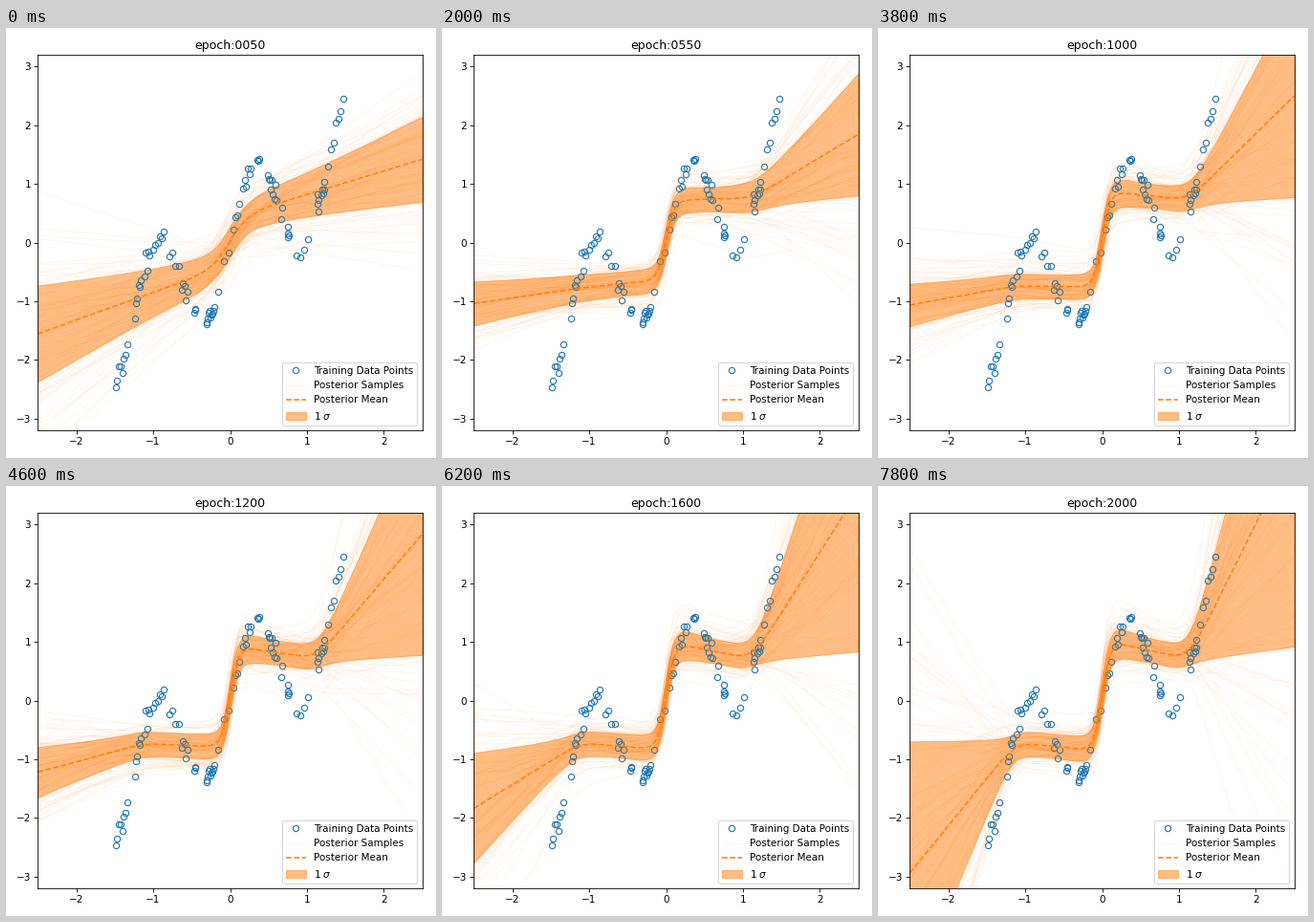
A matplotlib script for the animation above (8 s loop, 450 by 450 pixels).

```python
import numpy as np
import matplotlib.pyplot as plt
from matplotlib.animation import FuncAnimation
from matplotlib.collections import LineCollection

SIZE, DPI = 450, 75
FRAMES, INTERVAL = 40, 200
LEFT, RIGHT, TOP, BOTTOM = 33.4, 435.6, 28, 421   # axes box in stage pixels
XLIM, YLIM = 2.5, 3.2
N_SAMPLES = 100
KINK = 1.12   # where the outer slopes set in

# Runs of training inputs: first x, last x, count
RUNS = [(-1.49, -1.34, 8), (-1.24, -1.16, 6), (-1.11, -1.05, 5),
        (-1.0, -.86, 6), (-.79, -.63, 5), (-.62, -.55, 4), (-.46, -.45, 3),
        (-.31, -.21, 10), (-.15, -.02, 3), (.04, .12, 4), (.17, .27, 6),
        (.35, .38, 3), (.49, .6, 9), (.66, .68, 2), (.75, .76, 4),
        (.87, 1.01, 4), (1.14, 1.15, 4), (1.19, 1.23, 5), (1.28, 1.47, 7)]

x = np.linspace(-XLIM, XLIM, 401)


def training_data():
    xs = np.concatenate([np.linspace(*run) for run in RUNS])
    noise = np.random.default_rng(4).normal(0, 0.09, xs.size)
    return xs, xs + np.sin(5 * xs) + noise


def decay(start, end, rate, u):
    return end + (start - end) * np.exp(-rate * u)


def ramp(z, soft=0.08):
    """Zero below the kink, a straight slope above it."""
    return soft * np.logaddexp(0, z / soft)


def model(u):
    """Basis curves with the mean and deviation of their weights."""
    step = np.tanh(x / decay(.24, .11, 20, u))
    side = (1 + step) / 2
    pivot = decay(0, .8, 4, u)
    base = decay(.19, .145, 12, u)
    terms = [
        # curve, mean, deviation
        (np.ones_like(x), .02, base),
        (step, decay(.4, .78, 7, u), base),
        (1 - step ** 2, 0, .18),
        (side * (x - pivot), decay(.4, -.38, 2.5, u), .27),
        ((1 - side) * (x + pivot), decay(.47, -.17, 3, u),
         decay(.31, .15, 12, u)),
        (ramp(x - KINK), 2.95 * u, 2.45 * u),
        (-ramp(-x - KINK), .15 * u + 1.6 * u ** 3, 1.6 * u ** 4),
    ]
    basis, mu, sigma = zip(*terms)
    return np.array(basis), np.array(mu), np.array(sigma)


def band(mean, dev):
    return np.column_stack([np.r_[x, x[::-1]],
                            np.r_[mean + dev, (mean - dev)[::-1]]])


fig = plt.figure(figsize=(SIZE / DPI, SIZE / DPI), dpi=DPI)
ax = fig.add_axes([LEFT / SIZE, 1 - BOTTOM / SIZE,
                   (RIGHT - LEFT) / SIZE, (BOTTOM - TOP) / SIZE])
ax.set(xlim=(-XLIM, XLIM), ylim=(-YLIM, YLIM))
title = ax.set_title("epoch:0050")

points, = ax.plot(*training_data(), "o", mfc="none", mew=1.1,
                  color="tab:blue", label="Training Data Points")
samples = LineCollection([], colors="tab:orange", linewidths=0.5, alpha=0.12,
                         zorder=2, label="Posterior Samples")
ax.add_collection(samples, autolim=False)
mean_line, = ax.plot(x, 0 * x, "--", color="tab:orange", label="Posterior Mean")
spread = ax.fill_between(x, 0 * x, 0 * x, color="tab:orange", alpha=0.5,
                         label=r"1 $\sigma$")
ax.legend(handles=[points, samples, mean_line, spread], loc="lower right")


def update(frame):
    basis, mu, sigma = model(frame / (FRAMES - 1))
    mean = mu @ basis
    dev = np.sqrt(sigma ** 2 @ basis ** 2)
    z = np.random.default_rng(frame).normal(size=(N_SAMPLES, mu.size))
    paths = (mu + sigma * z) @ basis
    samples.set_segments([np.column_stack([x, y]) for y in paths])
    mean_line.set_ydata(mean)
    spread.set_verts([band(mean, dev)])
    title.set_text(f"epoch:{50 * (frame + 1):04d}")
    return samples, mean_line, spread, title


anim = FuncAnimation(fig, update, frames=FRAMES, interval=INTERVAL,
                     repeat=True, repeat_delay=0, blit=False)
plt.show()
```
